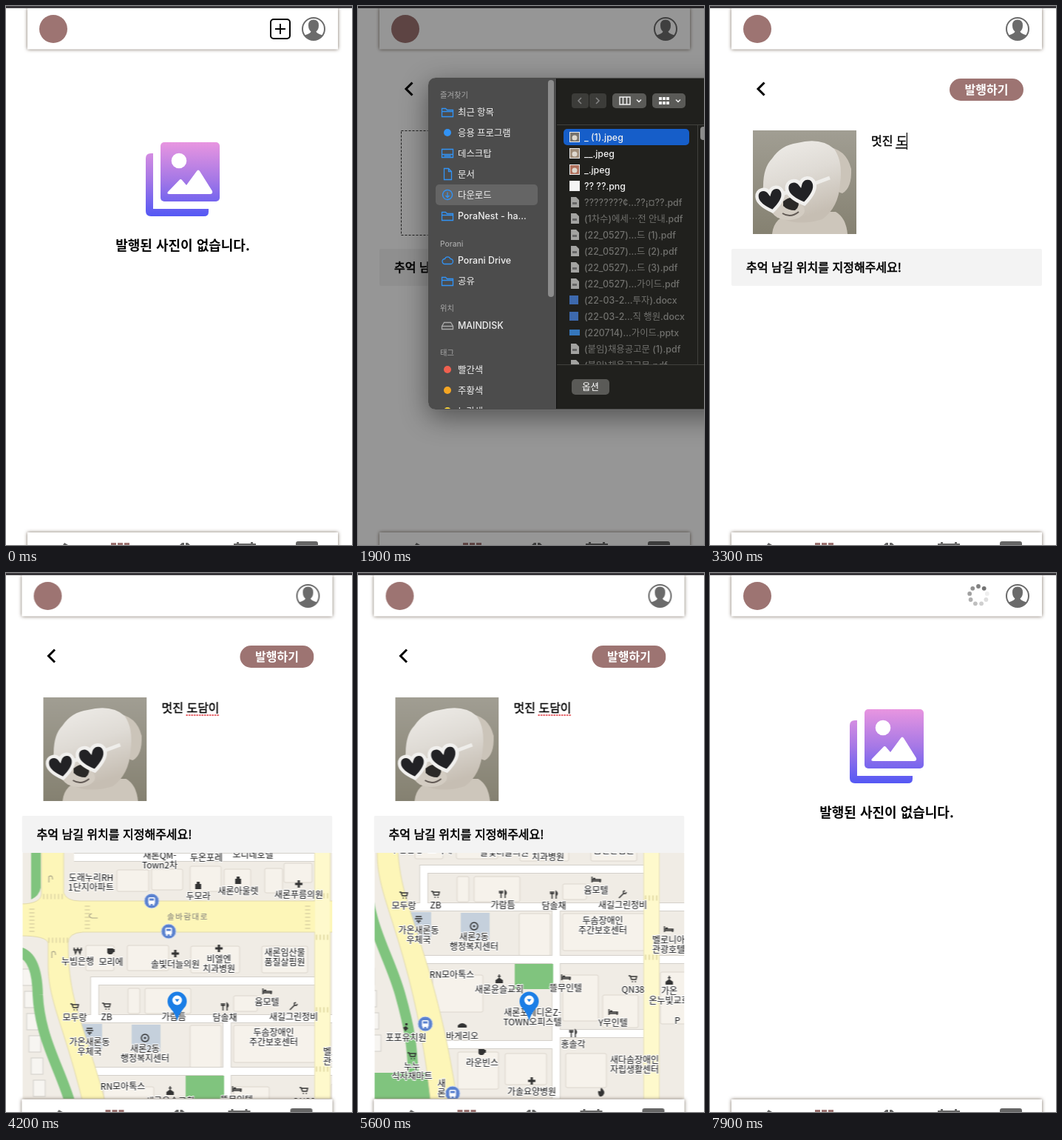
Recreate the animation shown at these times as an HTML page. Size 468 px wide and 728 px high, loop 8000 ms.

```html
<!DOCTYPE html>
<html lang="ko">
<head>
<meta charset="utf-8">
<title>사진 발행</title>
<style>
html,body{margin:0;width:100%;height:100%;overflow:hidden;background:#fff}
svg{display:block;width:468px;height:728px;font-family:"Noto Sans CJK KR","Noto Sans CJK JP","Noto Sans CJK",sans-serif}
#dialog{font:500 12.4px Inter,"Noto Sans CJK KR","Noto Sans CJK JP","Noto Sans CJK",sans-serif}
.shade{filter:drop-shadow(0 0 2.5px rgba(95,80,65,.85))}
.line{fill:none;stroke:#000;stroke-width:2}
.medium{font-size:16px;stroke:#000;stroke-width:.45px}
.label{font-size:12px;fill:#111;text-anchor:middle;paint-order:stroke;stroke:#fff;stroke-width:2.2px;stroke-linejoin:round}
.mark{fill:none;stroke:#333;stroke-width:1.5}
.solid{fill:#333}

#app,#home,#write,#plus,#spin,#map,#dim,#dialog,#picked,#accents{animation:8s step-end infinite}
#app{animation-name:app}
#home{animation-name:home}
#write{animation-name:write}
#plus{animation-name:plus}
#spin{animation-name:spin}
#map{animation-name:map}
#dim{animation-name:dim}
#dialog{animation-name:dialog}
#picked{animation-name:picked}
#accents{animation-name:accents}
#empty,#photo{animation:empty 8s step-end infinite}
#photo{animation-name:photo}
#wheel{animation:wheel 8s infinite;transform-origin:363px 30px}
#world{animation:pan 8s ease-in-out infinite}
#typing{animation:typing 8s infinite}

@keyframes app{0%,71.25%,100%{transform:none}48.75%{transform:translateX(-7.5px)}}
@keyframes home{0%,71.25%,100%{visibility:visible}8.75%{visibility:hidden}}
@keyframes write{0%,71.25%,100%{visibility:hidden}8.75%{visibility:visible}}
@keyframes plus{0%{visibility:visible}8.75%,100%{visibility:hidden}}
@keyframes spin{0%{visibility:hidden}71.25%,100%{visibility:visible}}
@keyframes map{0%,71.25%,100%{opacity:0}48.75%{opacity:1}}
@keyframes empty{0%{opacity:1}33.75%,100%{opacity:0}}
@keyframes photo{0%{opacity:0}33.75%,100%{opacity:1}}
@keyframes dim{0%,33.75%,100%{opacity:0}16.25%{opacity:.37}17.5%{opacity:.41}32.5%{opacity:.2}}
@keyframes dialog{0%,33.75%,100%{opacity:0}16.25%{opacity:1}31.25%{opacity:.86}32.5%{opacity:.4}}
@keyframes picked{0%{opacity:0}21.25%,100%{opacity:1}}
@keyframes accents{0%{filter:none}31.25%,100%{filter:brightness(0) opacity(.6)}}
@keyframes wheel{0%,75%{transform:rotate(-800deg);animation-timing-function:steps(20,start)}100%{transform:none}}
@keyframes pan{0%,53.75%{transform:none}68.75%,100%{transform:translate(-31px,-151px)}}
@keyframes typing{0%,35%{transform:none;animation-timing-function:steps(10,start)}47.5%,100%{transform:translateY(-400px)}}
</style>
</head>
<body>
<svg viewBox="0 0 468 728">
  <defs>
    <linearGradient id="violet" gradientUnits="userSpaceOnUse" x1="0" y1="184" x2="0" y2="284">
      <stop stop-color="#e895e0"/><stop offset=".5" stop-color="#a678e6"/><stop offset="1" stop-color="#5458f4"/>
    </linearGradient>
    <linearGradient id="wall" x2="0" y2="1"><stop stop-color="#a19e93"/><stop offset="1" stop-color="#858171"/></linearGradient>
    <linearGradient id="fur" x2=".3" y2="1"><stop stop-color="#efede9"/><stop offset=".5" stop-color="#dfdbd5"/><stop offset="1" stop-color="#c6beb3"/></linearGradient>
    <clipPath id="mapBox"><path d="M29.5 378h419v332h-419z"/></clipPath>
    <clipPath id="photoBox"><path d="M0 0h140v140H0z"/></clipPath>
    <clipPath id="textBox"><path d="M210 165h230v40H210z"/></clipPath>
    <clipPath id="sideBox"><path d="M95 98h173v446H95z"/></clipPath>
    <clipPath id="listBox"><path d="M269 161h199v323H269z"/></clipPath>
    <path id="heart" d="M0 15C-9 9-17 2-16-6C-15-15-4-16 0-8C4-16 15-15 16-6C17 2 9 9 0 15z"/>
  </defs>
  <rect width="468" height="728" fill="#fff"/>

  <g id="app">
    <g id="home">
      <path fill="url(#violet)" d="M199 199V274H274V278Q274 284 268 284H196Q189 284 189 277V206Q189 199 196 199z"/>
      <rect x="209" y="184" width="80" height="80" rx="5" fill="url(#violet)"/>
      <circle cx="234" cy="209" r="10.3" fill="#fff"/>
      <path fill="#fff" d="M219 251L234.500 235Q236 233 238 235L244 242L258 223Q260 220 262 223L279 250Q280 254 276 254H221Q217 254 219 251z"/>
      <text x="239" y="330" text-anchor="middle" font-size="18" font-weight="700">발행된 사진이 없습니다.</text>
    </g>

    <g id="write">
      <path class="line" style="stroke-width:3" d="M73.500 103.500L65 112L73.500 120.500"/>
      <rect x="324" y="98" width="100" height="30" rx="15" fill="#9d7472"/>
      <text x="374" y="119" text-anchor="middle" font-size="16" font-weight="700" fill="#fff">발행하기</text>
      <g id="empty">
        <rect x="58.5" y="168.500" width="141" height="141" fill="none" stroke="#333" stroke-dasharray="3 2"/>
        <path class="line" d="M117 239h24M129 227v24"/>
      </g>
      <g id="photo"><g transform="translate(58 168)" clip-path="url(#photoBox)">
        <path fill="url(#wall)" d="M0 0h140v140H0z"/>
        <path fill="#cdc6bb" d="M26 140Q28 116 58 110H112Q126 118 128 140z"/>
        <path fill="#cbc4b9" d="M98 22Q126 24 133 52Q134 78 121 85Q108 82 98 60z"/>
        <path fill="url(#fur)" d="M14 75Q14 50 26 38Q38 20 60 17Q92 9 110 25Q122 42 118 72Q116 104 94 120Q62 130 36 118Q10 106 14 75z"/>
        <ellipse cx="48" cy="108" rx="22" ry="13" fill="#d3ccc2"/>
        <path fill="#2b2927" d="M41 96Q50 88 60 92Q65 102 57 108Q47 108 41 102z"/>
        <path d="M40 112Q51 119 62 110" fill="none" stroke="#625a55" stroke-width="2"/>
        <path d="M38 86L50 83M80 73L104 64" stroke="#eeedea" stroke-width="5"/>
        <g fill="#222225" stroke="#f1f0ee" stroke-width="4">
          <use href="#heart" transform="translate(24 93) rotate(-10) scale(1.1)"/>
          <use href="#heart" transform="translate(66 82) rotate(-12) scale(1.18)"/>
        </g>
      </g></g>
      <g clip-path="url(#textBox)"><g id="typing"></g></g>
      <rect x="29" y="328" width="420" height="50" rx="2" fill="#f3f3f3"/>
      <text x="49" y="359" class="medium" style="stroke-width:.6px">추억 남길 위치를 지정해주세요!</text>
      <g id="map">
        <g clip-path="url(#mapBox)"><g transform="translate(7.5)"><g id="world"></g></g></g>
        <path fill="#1b7ee6" d="M239 605Q237 596 230 588A13 13 0 1 1 248 588Q241 596 239 605z"/>
        <circle cx="239" cy="577" r="6.500" fill="#fff"/>
        <path fill="#1b7ee6" d="M236 575.500h6l-3 4z"/>
      </g>
    </g>

    <g class="shade"><path fill="#fff" d="M29 3h420v55.500H29z"/></g>
    <circle cx="64" cy="31" r="19" fill="#9d7472"/>
    <circle cx="416" cy="31" r="15" fill="#fff" stroke="#6b6b6b" stroke-width="2"/>
    <path fill="#6b6b6b" d="M416 18.500Q423 18.500 423 26Q423 32 419.500 34.500Q420 37 428 39.500Q423 46 416 46Q409 46 404 39.500Q412 37 412.500 34.500Q409 32 409 26Q409 18.500 416 18.500z"/>
    <g id="plus"><rect class="line" x="358" y="18" width="26" height="26" rx="4"/><path class="line" d="M364 31h14M371 24v14"/></g>
    <g id="spin"><g id="wheel"></g></g>

    <g class="shade"><path fill="#fff" d="M29 711h420v30H29z"/></g>
    <g fill="#666">
      <path d="M77 728l2-3 5 3zM235 728l3-3h3v3zM243 728v-3h3l3 3zM308 728v-2h4v-2h3v2h16v-2h3v2h4v2z"/>
      <rect x="392" y="723" width="30" height="20" rx="3"/>
      <path fill="#9d7472" d="M142 725h7v3h-7zM151 725h7v3h-7zM160 725h7v3h-7z"/>
    </g>
  </g>
  <path fill="#39373b" d="M0 0h468v3H0z"/>
  <rect id="dim" width="468" height="728"/>

  <g id="dialog">
    <rect x="95" y="97" width="420" height="448" rx="10" fill="#20201d" stroke="#777" style="filter:drop-shadow(0 10px 18px rgba(0,0,0,.45))"/>
    <path fill="#4c4c4c" d="M268 97.500V544.500H105Q95.500 544.500 95.500 535V107Q95.500 97.500 105 97.500z"/>
    <path d="M268.500 98V544" stroke="#111"/>
    <path d="M269 160.500H468M269 484.500H468M459.500 161V484" stroke="#41413d"/>
    <rect x="257" y="100" width="8" height="293" rx="4" fill="#8c8c8c"/>
    <rect x="463" y="163" width="9" height="18" rx="4" fill="#8c8c8c"/>
    <rect x="105" y="241" width="138" height="28" rx="5" fill="#656565"/>
    <g clip-path="url(#sideBox)"><g id="accents" fill="none" stroke="#3293f5" stroke-width="1.3"></g><g id="places" fill="#f0f0f0"></g></g>
    <g fill="#3c3c39">
      <rect x="289" y="118" width="23" height="20" rx="4"/><rect x="313" y="118" width="23" height="20" rx="4"/>
      <g fill="#5a5a57"><rect x="344" y="118" width="46" height="20" rx="5"/><rect x="398" y="118" width="45" height="20" rx="5"/><rect x="289" y="504" width="51" height="21" rx="5"/></g>
    </g>
    <path d="M302 124l-4 4 4 4M322 124l4 4-4 4" fill="none" stroke="#858585" stroke-width="1.5"/>
    <path d="M354 123h14v10h-14zM358.500 123v10M363.500 123v10M377 126.500l3 3 3-3M430 126.500l3 3 3-3" fill="none" stroke="#eee" stroke-width="1.5"/>
    <path d="M407 125h14M407 131h14" stroke="#eee" stroke-width="4" stroke-dasharray="4 1"/>
    <text x="314.500" y="519" text-anchor="middle" fill="#fff">옵션</text>
    <g clip-path="url(#listBox)">
      <rect id="picked" x="278" y="166" width="170" height="22" rx="5" fill="#165ec9"/>
      <g id="files"></g>
    </g>
  </g>
</svg>
<script>
const fill = (id, html) => document.getElementById(id).innerHTML = html;
const text = (x, y, s, more = '') => `<text x="${x}" y="${y}" ${more}>${s}</text>`;
const rect = (x, y, w, h, more = '') => `<rect x="${x}" y="${y}" width="${w}" height="${h}" ${more}/>`;
const circle = (x, y, r, more = '') => `<circle cx="${x}" cy="${y}" r="${r}" ${more}/>`;

// Spinner: nine dots, fading anticlockwise from the head
fill('wheel', Array.from({length: 9}, (_, i) => {
  const a = (-50 - i * 40) * Math.PI / 180;
  return circle(363 + 12 * Math.cos(a), 30 + 12 * Math.sin(a), 2.9, `fill="#727272" opacity="${1 - i * .11}"`);
}).join(''));

// Each typed state is one line of a strip that steps upwards
const states = ['ㅁ', '머', '멋', '멋지', '멋진', '멋진 도', '멋진 도다', '멋진 도담', '멋진 도담이', '멋진 도담이'];
const width = s => [...s].reduce((w, c) => w + (c === ' ' ? 3.6 : 14.72), 0);
fill('typing', text(218, 188, '문구 입력...', 'font-size="16" fill="#777"') + states.map((s, i) => {
  const y = 228 + i * 40, end = 218 + width(s);
  const under = i < 9
    ? rect(end - 14.7, y + 3, 14.7, 1.6) + rect(end, y - 17, 1.2, 23)
    : `<path d="M${end - 44} ${y + 4}H${end}" stroke="#e0434a" stroke-width="2" stroke-dasharray="2 1.5"/>`;
  return text(218, y, s, 'class="medium"') + under;
}).join(''));

// Dialog sidebar
const shapes = {
  folder: 'M0 3h5l2 2h8v9H0zM0 7h15',
  desk: 'M0 2h15v11H0zM0 9h15M3 11h9',
  doc: 'M3 0h6l4 4v11H3zM9 0v4h4',
  down: 'M7.500 1a6.500 6.500 0 1 0 .1 0M7.500 4v7M5 8.500l2.500 2.500L10 8.500',
  cloud: 'M4 13a3.500 3.500 0 0 1 0-7a4 4 0 0 1 7.500 0a3.500 3.500 0 0 1 0 7z',
  drive: 'M0 9h15v4H0zM0 9l3-5h9l3 5'
};
const places = [
  [143, '최근 항목', 'folder'], [171, '응용 프로그램', '#3293f5'], [199, '데스크탑', 'desk'],
  [227, '문서', 'doc'], [255, '다운로드', 'down'], [283, 'PoraNest - ha...', 'folder'],
  [343, 'Porani Drive', 'cloud'], [371, '공유', 'folder'], [431, 'MAINDISK', 'drive'],
  [491, '빨간색', '#f0604f'], [519, '주황색', '#f5a623'], [547, '노란색', '#f7d33c']
];
const heads = [[120, '즐겨찾기'], [321, 'Porani'], [408, '위치'], [468, '태그']];
fill('accents', places.map(([y, , k]) => shapes[k]
  ? `<path d="${shapes[k]}" transform="translate(113.500 ${y - 7.5})" ${k === 'drive' ? 'stroke="#aaa"' : ''}/>`
  : circle(121, y, 5, `fill="${k}" stroke="none"`)).join(''));
fill('places', places.map(([y, s]) => text(135, y + 4.5, s)).join('') +
  heads.map(([y, s]) => text(111, y + 4, s, 'font-size="10.3" fill="#a8a8a8"')).join(''));

// Dialog file list
const files = ['_ (1).jpeg', '__.jpeg', '_.jpeg', '?? ??.png', '????????¢...??¡¤??.pdf', '(1차수)에세⋯전 안내.pdf',
  '(22_0527)...드 (1).pdf', '(22_0527)...드 (2).pdf', '(22_0527)...드 (3).pdf', '(22_0527)...가이드.pdf',
  '(22-03-2...투자).docx', '(22-03-2...직 행원.docx', '(220714)...가이드.pptx', '(붙임)채용공고문 (1).pdf', '(붙임)채용공고문.pdf'];
const thumbs = ['#77736c', '#a08d78', '#b0705c', '#f4f4f4'];
const fileIcon = (s, i, y) => {
  if (i < 4) return rect(286.5, y - 6.5, 13, 13, `fill="${thumbs[i]}" stroke="#eee"`) +
    (i < 3 ? circle(293, y + 1, 3.5, 'fill="#ded8ce"') : '');
  if (s.endsWith('docx')) return rect(286, y - 6, 12, 12, 'fill="#3d69ad"');
  if (s.endsWith('pptx')) return rect(286, y - 4, 14, 8, 'fill="#3577bd"');
  return `<path d="M288 ${y - 7}h7l4 4v10h-11z" fill="#a3a3a1"/>` + rect(290, y, 6, 3, 'fill="#666"');
};
fill('files', files.map((s, i) => {
  const y = 177 + i * 22;
  return fileIcon(s, i, y) + text(306, y + 4.5, s, `fill="${i < 4 ? '#f0f0f0' : '#70706d'}"`);
}).join(''));

// Map
const marks = {
  cart: 'M0 2h2l2 5h6l1-4H3M4.500 10h1.500M8.500 10h1.500',
  bag: 'M2 4h2V1h4v3h2v7H2z',
  cup: 'M1 2h8v1h2v4H9v1L7 10H3L1 8z',
  cross: 'M4.500 1h3v3.500H11v3H7.500V11h-3V7.500H1v-3h3.500z',
  bed: 'M.5 2v8M0 8h12V6H0M2 4.500h3M11.500 6v4',
  fork: 'M1.500 1v3h4V1M3.500 1v10M9 11V1q3 3 0 6',
  tool: 'M1 11l6-6M7 5V2l2-1M7 5h3l1-2',
  church: 'M5.300 0h1.400v2H8v1.200H6.700V5L11 8v4H1V8l4.300-3V3.200H4V2h1.300z',
  post: 'M2 2h8M1 5h10M3 8h6M6 8v3',
  spot: 'M6 1a5 5 0 1 0 .1 0M6 4.500v3M4.500 6h3',
  bread: 'M0 9V6q6-6 12 0v3z',
  flame: 'M6 0q5 5 4 8t-4 4-4-4 2-3q1 1 1-1t1-4z',
  kid: 'M5 1h3v3H5zM2 7l4-2 3 3-4 4z',
  won: 'M1 2l2 8 3-7 3 7 2-8M0 5h12'
};
const labels = [
  [208, 381, '새론QM-|Town2차'], [271, 384, '두온포레'], [334, 380, '오디네호텔'], [115, 411, '도래누리RH|1단지아파트'],
  [260, 436, '두모라', 'bag'], [314, 429, '새론아울렛', 'bag'], [396, 434, '새론푸름의원', 'cross'],
  [97, 524, '누빔은행', 'won'], [142, 525, '모리에', 'cup'], [229, 528, '솔빛더늘의원', 'cross'],
  [288, 521, '비엘엔|치과병원', 'cross'], [377, 512, '새론임산물|품질살핌원'], [353, 579, '윰모텔', 'bed'],
  [93, 600, '모두랑', 'cart'], [136, 599, 'ZB', 'cart'], [227, 599, '가람틈', 'fork'], [296, 600, '담솔채', 'fork'],
  [389, 599, '새길그린정비', 'tool'], [113, 633, '가온새론동|우체국', 'post'], [188, 642, '새론2동|행정복지센터', 'spot'],
  [362, 620, '두솜장애인|주간보호센터'], [158, 693, 'RN모아톡스'], [451, 646, '벨로니아|관광호텔', 'bed'],
  [222, 713, '새론윤슬교회', 'church'], [312, 711, '뜰무인텔', 'bed'], [403, 713, 'QN38', 'cart'],
  [452, 715, '가온|온누빛교회', 'church'], [267, 744, '새론포레디온Z-|TOWN오피스텔'], [376, 758, 'Y무인텔', 'bed'],
  [172, 776, '바게리오', 'bread'], [322, 787, '홍솔각', 'fork'], [96, 778, '포포유치원', 'kid'],
  [199, 812, '라운빈스', 'cup'], [104, 817, '누누|식자재마트', 'cart'], [405, 808, '새다솜장애인|자립생활센터'],
  [266, 851, '가솔요양병원', 'cross'], [360, 866, '', 'flame'], [463, 755, 'P'], [144, 840, '새|론']
];
const blocks = [
  [150, 401, 43, 29], [197, 400, 42, 28], [249, 396, 42, 34], [295, 400, 36, 30], [350, 399, 24, 33], [376, 392, 38, 26],
  [108, 503, 38, 34], [164, 503, 56, 34], [250, 504, 66, 36], [346, 504, 62, 36],
  [165, 561, 16, 34], [188, 561, 62, 34], [308, 571, 32, 21], [249, 611, 42, 57], [308, 611, 110, 50],
  [132, 694, 68, 50], [308, 694, 48, 62], [362, 721, 48, 44], [166, 798, 55, 50], [230, 800, 56, 42], [312, 800, 55, 46], [440, 690, 40, 70]
];
const stroke = (d, color, w, more = '') => `<path d="${d}" fill="none" stroke="${color}" stroke-width="${w}" ${more}/>`;
const streets = 'M120 602V551H425M96 602H480M299 602V870M100 673H480M299 773H425M150 788H299M92 384H425';
const avenue = 'M48 370H78V432Q82 443 100 443H480V485H104Q84 486 84 500C84 560 96 590 112 640S150 760 166 870H130C122 800 112 740 92 670S57 570 57 530V500Q55 490 20 490V447Q50 447 48 430z';
const bus = (x, y) => circle(x, y, 10, 'fill="#5b82cf" stroke="#d5dff2"') +
  rect(x - 4.5, y - 5, 9, 9, 'rx="1.500" fill="#fff"') + rect(x - 3, y - 3.5, 6, 3, 'fill="#5b82cf"') +
  rect(x - 3.5, y + 4, 2, 2, 'fill="#fff"') + rect(x + 1.5, y + 4, 2, 2, 'fill="#fff"');
const label = ([x, y, s, k]) => {
  const d = marks[k];
  const icon = d ? `<path class="${d.endsWith('z') ? 'solid' : 'mark'}" d="${d}" transform="translate(${x - 6} ${y - 20})"/>` : '';
  return icon + s.split('|').map((part, i) => text(x, y + 4.5 + i * 13.3, part, 'class="label"')).join('');
};
const lots = Array.from({length: 9}, (_, i) => rect(22 + i * 3, 535 + i * 30, 16, 22, 'fill="#f7f5f1" stroke="#d2cfca"')).join('');
fill('world',
  rect(0, 360, 500, 520, 'fill="#f0ece5"') + lots +
  blocks.map(b => rect(...b, 'rx="2" fill="#f6f2eb" stroke="#dcd6cd"')).join('') +
  rect(97, 609, 33, 34, 'fill="#c5d0dc"') + rect(170, 610, 39, 36, 'fill="#c5d0dc"') +
  rect(45, 826, 84, 50, 'fill="#80c47e"') +
  '<path fill="#80c47e" d="M34 370H47V425Q45 436 34 441z"/>' +
  stroke('M18 512Q42 518 43 570C46 630 74 670 88 720S104 790 106 830', '#80c47e', 14) +
  stroke(streets, '#d4d0ca', 12) + stroke(streets, '#fff', 10) +
  rect(243, 679, 52, 34, 'fill="#80c47e"') +
  stroke('M428 370V870', '#e6e0b8', 22) + `<path d="${avenue}" fill="#fdf6b8" stroke="#e3dbac"/>` +
  stroke('M428 370V870', '#fef9cc', 20) +
  stroke('M50 437H80M57 496H86M110 449V482M35 453V485M408 449V482M419 436H438M419 492H438M419 590H438M419 670H438', '#e5dda8', 7, 'stroke-dasharray="2 3"') +
  stroke('M58 418v-8q5-3 5 4M116 466h8M116 460q-7 3 0 6M62 520v-8q5-3 5 4', '#aaa58a', 1.2) +
  text(246, 468, '솔바람대로', 'text-anchor="middle" font-size="10.500" letter-spacing="1.500" fill="#777"') +
  bus(197, 443) + bus(220, 484) + bus(122, 760) + bus(159, 854) +
  labels.map(label).join(''));
</script>
</body>
</html>
```
